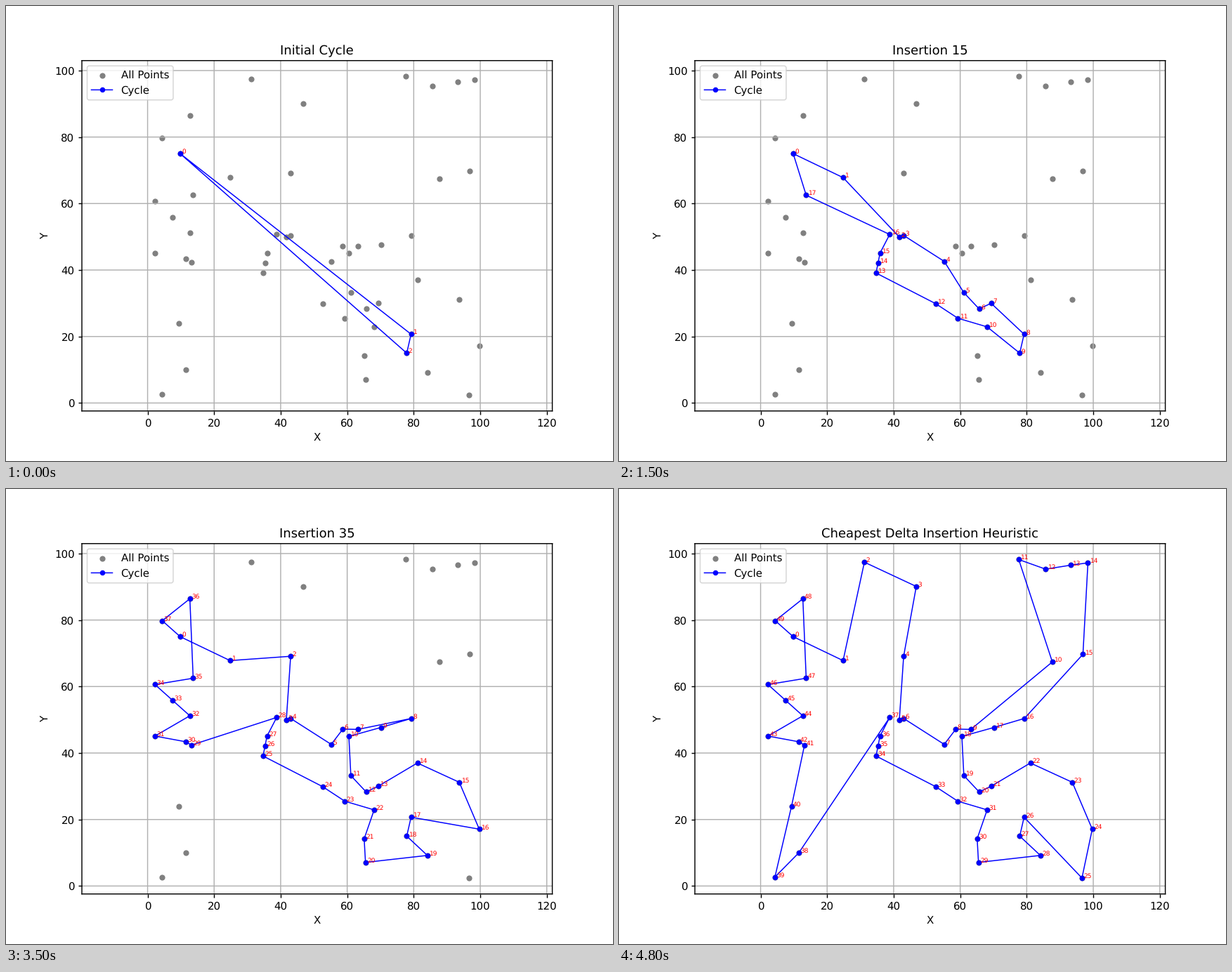
A matplotlib script that plays this animation: 864x648 px, repeating every 4900 ms.

```python
import numpy as np
import matplotlib.pyplot as plt
from matplotlib.animation import FuncAnimation

# Soft, unsnapped strokes and unhinted text.
plt.rcParams.update({
    "path.snap": False, "text.hinting": "none", "axes.linewidth": 0.96,
    "grid.linewidth": 0.96, "xtick.major.width": 0.96,
    "ytick.major.width": 0.96,
})

# The cities to visit; the first three form the starting triangle.
POINTS = np.array([
    (9.8, 75.0), (79.2, 20.7), (77.9, 15.0), (31.2, 97.4), (46.8, 90.1),
    (77.6, 98.2), (85.7, 95.3), (93.2, 96.5), (98.4, 97.2), (12.7, 86.4),
    (4.4, 79.8), (24.8, 67.8), (43.0, 69.1), (87.7, 67.4), (96.9, 69.7),
    *np.linspace((2.2, 60.6), (12.7, 51.2), 3),
    *np.linspace((35.9, 45.1), (34.7, 39.1), 3),
    (13.7, 62.5), (2.2, 45.1), (11.4, 43.4), (13.2, 42.4), (38.8, 50.7),
    (41.7, 49.9), (43.0, 50.4), (55.2, 42.6), (58.7, 47.2), (60.5, 45.0),
    (63.2, 47.1), (70.2, 47.7), (79.3, 50.4), (81.1, 37.0), (93.7, 31.2),
    (61.1, 33.2), (65.7, 28.3), (69.3, 30.0), (52.6, 29.9), (59.3, 25.5),
    (68.1, 22.9), (99.7, 17.1), (65.1, 14.2), (65.5, 7.1), (84.1, 9.2),
    (96.6, 2.4), (9.3, 24.0), (11.5, 10.0), (4.3, 2.7),
])
DIST = np.linalg.norm(POINTS[:, None] - POINTS[None], axis=2)


def insertion_steps():
    """Grow the cycle by the cheapest insertion, keeping every stage."""
    cycle = [0, 1, 2]
    rest = list(range(3, len(POINTS)))
    steps = [cycle[:]]
    while rest:
        a, b = np.array(cycle), np.roll(cycle, -1)
        delta = DIST[rest][:, a] + DIST[rest][:, b] - DIST[a, b]
        k, edge = np.unravel_index(delta.argmin(), delta.shape)
        cycle.insert(edge + 1, rest.pop(k))
        steps.append(cycle[:])
    return steps


STEPS = insertion_steps()
LAST = len(STEPS)
TITLES = {0: "Initial Cycle", LAST: "Cheapest Delta Insertion Heuristic"}

fig, ax = plt.subplots(figsize=(8, 6), dpi=108)
ax.scatter(*POINTS.T, s=20, color="gray", label="All Points")
line, = ax.plot([], [], "o-", color="blue", lw=1, ms=4, label="Cycle")
labels = [ax.text(0, 0, str(i), color="red", fontsize=6)
          for i in range(len(POINTS))]
title = ax.set_title("")
ax.set(xlabel="X", ylabel="Y")
ax.axis("equal")
ax.legend(loc="upper left")
ax.grid(True)


def update(n):
    cycle = STEPS[min(n, LAST - 1)]
    line.set_data(*POINTS[cycle + cycle[:1]].T)
    for label in labels:
        label.set_visible(False)
    for label, (x, y) in zip(labels, POINTS[cycle]):
        label.set(position=(x + 0.5, y), visible=True)
    title.set_text(TITLES.get(n, f"Insertion {n}"))
    return [line, title, *labels]


anim = FuncAnimation(fig, update, frames=LAST + 1, interval=100,
                     init_func=lambda: update(0), repeat=True, repeat_delay=0)
plt.show()
```
